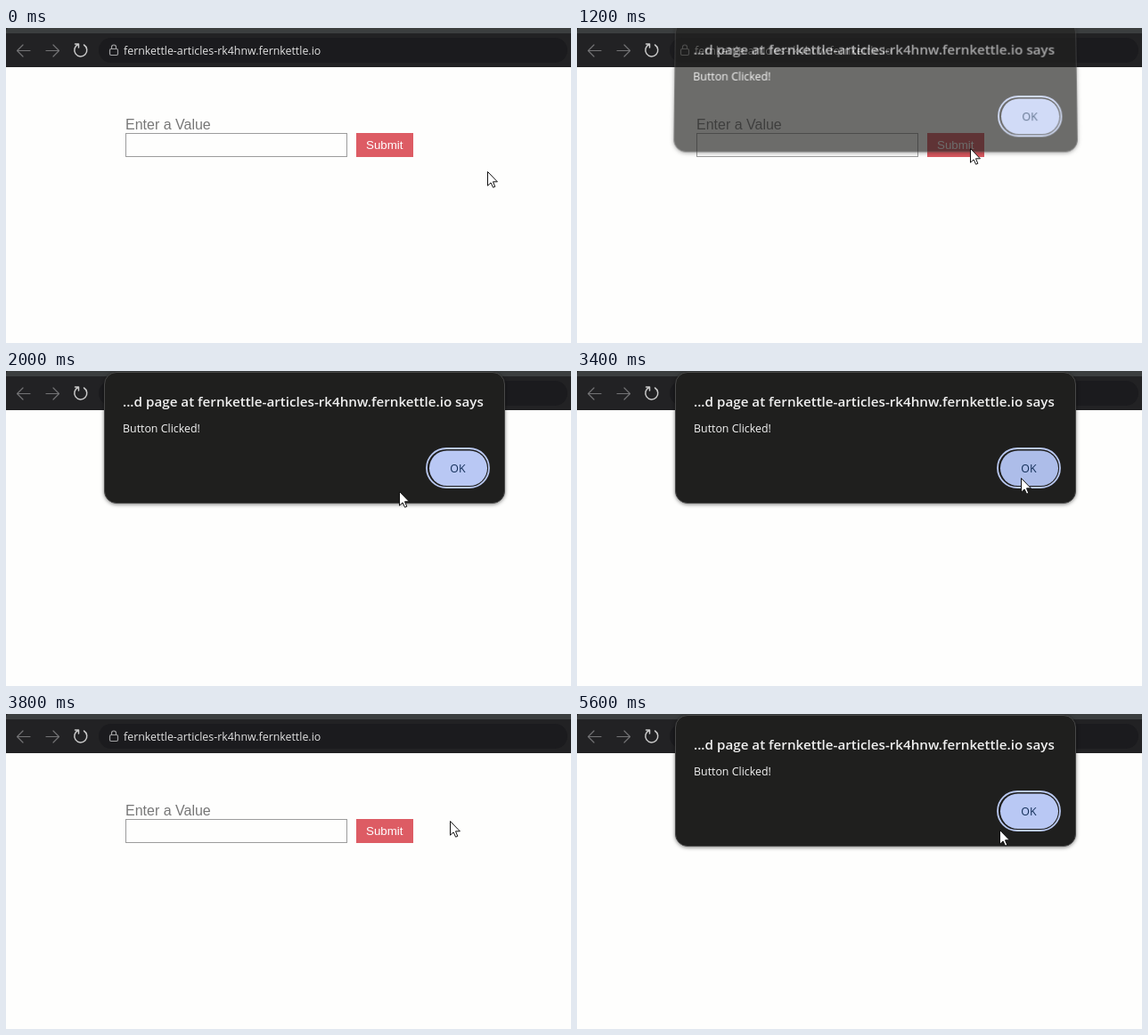
An HTML page for the animation above (7200 ms loop, 634 by 354 pixels).

```html
<!DOCTYPE html>
<html lang="en">
<head>
<meta charset="utf-8">
<title>Submit alert</title>
<style>
  html, body { margin: 0; width: 100%; height: 100%; overflow: hidden; background: #fefefd; }
  svg { position: absolute; left: 0; top: 0; overflow: visible; }
  text { font-family: "Open Sans", "Noto Sans", sans-serif; font-size: 12.4px; }
  .form { font-family: "Liberation Sans", Arial, sans-serif; }
  .icon { fill: none; stroke-width: 1.2; stroke-linecap: round; stroke-linejoin: round; }
  #dialog { transform-origin: 317px 0; filter: drop-shadow(0 1px 2px rgba(0, 0, 0, .5)); }
</style>
</head>
<body>
<svg width="634" height="354">
  <rect width="634" height="44" fill="#222224"/>
  <rect width="634" height="6" fill="#3b3e3f"/>
  <path d="M0 0h2q-2 1-2 4z" fill="#222224"/>
  <rect x="104" y="11" width="526" height="28" rx="14" fill="#1b1b1e"/>
  <g class="icon" stroke="#737375">
    <path d="M27 25.500H12.500M19 19l-6.500 6.500L19 32"/>
    <path d="M45 25.500H59.500M53 19l6.500 6.500L53 32"/>
  </g>
  <path class="icon" stroke="#cacaca" style="stroke-width:1.5" d="M81 18.500A7 7 0 1 0 87.500 19M77.500 18H81.500V22"/>
  <g class="icon" stroke="#a2a2a4">
    <rect x="116.500" y="23.500" width="9" height="7" rx="1.500"/>
    <path d="M118.500 23.500v-2a2.500 2.500 0 0 1 5 0v2"/>
  </g>
  <text class="url" x="132" y="30" fill="#e2e2e2"></text>

  <text class="form" x="134" y="114" fill="#777" style="font-size:16px">Enter a Value</text>
  <rect x="134.500" y="118.500" width="248" height="26" fill="#fefefd" stroke="#9c9c9c"/>
  <rect id="submit" x="393" y="118" width="64" height="27"/>
  <text class="form" x="404" y="136" fill="#fff" style="font-size:13.333px">Submit</text>
</svg>

<svg id="dialog" width="634" height="354">
  <rect x="110.500" y="1.500" width="449" height="147" rx="13.500" fill="#1f1f1e" stroke="#484848"/>
  <text x="131" y="40" fill="#f0f0f0" style="font-size:15.2px;font-weight:600">...d page at <tspan class="url"></tspan> says</text>
  <text x="131" y="69" fill="#f4f4f4">Button Clicked!</text>
  <rect x="472" y="87" width="70" height="44" rx="22" fill="none" stroke="#b9c8f1" stroke-width="1.800"/>
  <rect id="ok" x="475" y="89.500" width="65" height="39.500" rx="19.750"/>
  <text x="507" y="114" fill="#14305a" text-anchor="middle" style="font-weight:500">OK</text>
</svg>

<svg id="cursor" width="13" height="20">
  <path d="M.5.5V16.200L4.100 12.900 6.600 18.200 8.800 17.300 6.500 11.800H11.400Z" fill="#fff" stroke="#111"/>
</svg>

<script>
const LOOP = 7200, TICK = 200, FADE = 215;
const el = id => document.getElementById(id);
const clamp = v => Math.min(1, Math.max(0, v));
const ramp = (t, start, length) => clamp((t - start) / length);
const easeOut = u => 1 - (1 - u) ** 1.3;

for (const node of document.querySelectorAll('.url'))
  node.textContent = 'fernkettle-articles-rk4hnw.fernkettle.io';

const rest = { x: 540, y: 161 };
const moves = [
  { start: 0, length: 800, x: 441, y: 135 },
  { start: 2750, length: 350, x: 498, y: 120 },
  { start: 4200, length: 600, x: 439, y: 130 },
  { start: 5200, length: 200, x: 474, y: 130 }
];

function cursorAt(t) {
  let { x, y } = rest;
  for (const move of moves) {
    const u = easeOut(ramp(t, move.start, move.length));
    x += (move.x - x) * u;
    y += (move.y - y) * u;
  }
  return { x: Math.round(x), y: Math.round(y) };
}

// The alert opens twice and is dismissed once; the loop ends with it open.
const dialogAt = t =>
  ramp(t, 1058, FADE) - ramp(t, 3430, FADE) + ramp(t, 4992, FADE);

function isOver(id, { x, y }) {
  const box = el(id).getBBox();
  return x >= box.x && x < box.x + box.width && y >= box.y && y < box.y + box.height;
}

function draw(now) {
  const t = Math.floor(now % LOOP / TICK) * TICK;
  const cursor = cursorAt(t);
  const shown = dialogAt(t);
  const lift = 18 * (1 - shown ** 2);

  el('cursor').style.transform = `translate(${cursor.x}px, ${cursor.y}px)`;
  el('dialog').style.opacity = shown;
  el('dialog').style.transform = lift
    ? `translateY(${-lift}px) perspective(1500px) rotateX(${lift / 2}deg)` : 'none';
  el('submit').setAttribute('fill', isOver('submit', cursor) ? '#d9585f' : '#dd5c64');
  el('ok').setAttribute('fill', isOver('ok', cursor) ? '#adbde9' : '#b9c8f4');
  requestAnimationFrame(draw);
}
requestAnimationFrame(draw);
</script>
</body>
</html>
```
